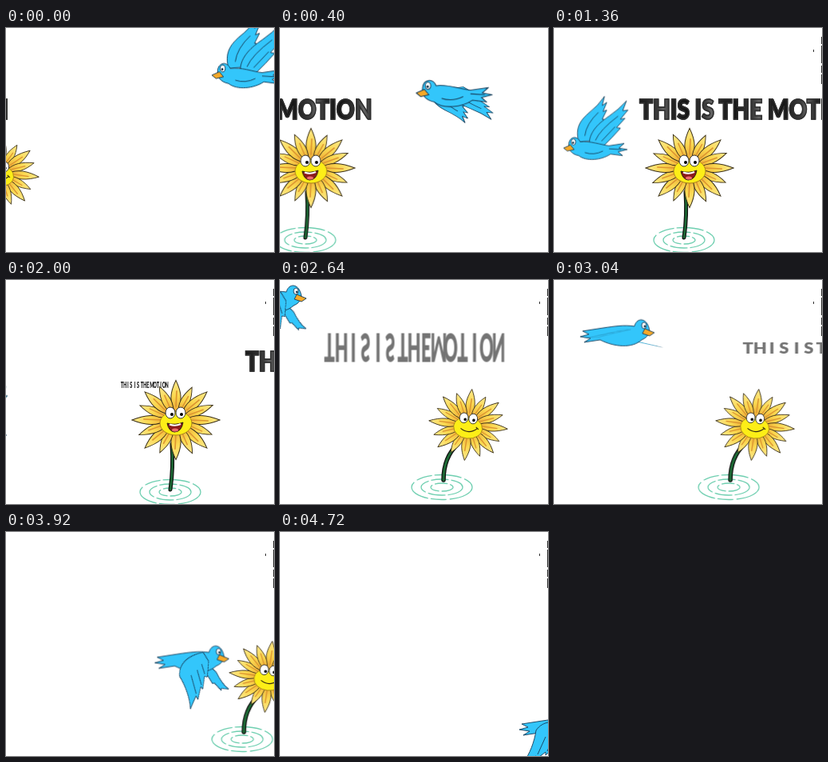
Animation of 336 by 280 pixels, one loop 4800 ms. Source, as an HTML page without scripts:

```html
<!DOCTYPE html>
<html lang="en">
<head>
<meta charset="utf-8">
<title>Bird, flower and text</title>
<style>
html, body { margin: 0; width: 100%; height: 100%; overflow: hidden; background: #fff; }
main { position: relative; width: 100%; height: 100%; overflow: hidden; contain: strict; }
svg, div { position: absolute; left: 0; top: 0; }
svg { display: block; width: 100%; height: 100%; }

/* one 4.8 s loop, 80 ms per step; the tiny lead avoids rounding at step edges */
.loop { animation: 4800ms -2ms infinite both; }

.fly-left { animation-name: fly-left; }
.fly-right { animation-name: fly-right; }
.flower { animation-name: grow-right; }
.upright, .leaning, .edge { animation-timing-function: step-end; }
.upright { animation-name: upright; }
.leaning { animation-name: leaning; }
.edge { animation-name: edge; }
.wing { animation: flap 640ms -2ms infinite steps(2); }
.left-wing { transform-origin: 40px -5px; --down: 0deg; }
.front-wing { transform-origin: -28px 10px; --down: 38deg; }
.back-wing { transform-origin: -45px 0; --down: -40deg; }

.title, .spin { font-family: Lato, sans-serif; font-weight: 900; line-height: 1; white-space: nowrap; }
.title {
  top: 84px; font-size: 28px; color: transparent;
  scale: 1 1.22; transform-origin: 0 0;
  background: repeating-linear-gradient(90deg, #151515 0, #3a3a3a 22px, #666 30px, #222 42px, #151515 60px);
  -webkit-background-clip: text; background-clip: text;
  -webkit-text-stroke: 1.4px #303030;
  animation-name: slide;
}
.spin { left: 168px; top: 85px; font-size: 22px; translate: -50% -50%; animation-name: zoom; }
.spin b { display: inline-flex; justify-content: center; width: .68em; font-weight: 900; animation-name: flip; }

@keyframes fly-left {
  0% { transform: translate(258px, 59px) scale(1.05); animation-timing-function: steps(9); }
  15% { transform: translate(101px, 99px) scale(1.2); animation-timing-function: steps(8); }
  28.3333% { transform: translate(12px, 150px) scale(.95); animation-timing-function: steps(8); }
  41.6667% { transform: translate(-79px, 192px) scale(.95); animation-timing-function: steps(2); }
  45%, 100% { transform: translate(-110px, 204px) scale(.95); }
}
@keyframes fly-right {
  0%, 41.6667% { transform: translate(-115px, -45px); animation-timing-function: steps(8); }
  55% { transform: translate(33px, 23px); animation-timing-function: steps(9); }
  70% { transform: translate(200px, 100px); animation-timing-function: steps(17); }
  98.3333%, 100% { transform: translate(393px, 242px); }
}
@keyframes flap {
  0%, 12.5% { transform: rotate(var(--down)) scaleY(1); animation-timing-function: steps(1); }
  25%, 37.5% { transform: rotate(0deg) scaleY(1); }
  62.5% { transform: rotate(0deg) scaleY(-.6); animation-timing-function: steps(3); }
  100% { transform: rotate(var(--down)) scaleY(1); }
}
@keyframes grow-right {
  0% { transform: translateX(-41px); animation-timing-function: steps(9); }
  15% { transform: translateX(90px); animation-timing-function: steps(8); }
  28.3333% { transform: translateX(163px); animation-timing-function: steps(8); }
  41.6667% { transform: translateX(206px); animation-timing-function: steps(8); }
  55% { transform: translateX(203px); animation-timing-function: steps(9); }
  70% { transform: translateX(232px); animation-timing-function: steps(17); }
  98.3333%, 100% { transform: translateX(388px); }
}
@keyframes upright { 0% { opacity: 0; } 6.6667% { opacity: 1; } 48.3333%, 100% { opacity: 0; } }
@keyframes leaning { 0% { opacity: 1; } 6.6667% { opacity: 0; } 48.3333%, 100% { opacity: 1; } }
@keyframes edge { 0% { opacity: 0; } 13.3333%, 100% { opacity: 1; } }
@keyframes slide {
  0% { transform: translateX(-277px); animation-timing-function: steps(9); }
  15% { transform: translateX(-75px); animation-timing-function: steps(8); }
  28.3333% { transform: translateX(107px); animation-timing-function: steps(8); }
  41.6667% { transform: translateX(300px); animation-timing-function: steps(2); }
  45%, 100% { transform: translateX(346px); }
}
@keyframes zoom {
  0%, 36.6667% { transform: translate(8px, 65px) scale(0); color: #222; word-spacing: 0em; animation-timing-function: steps(3); }
  41.6667% { transform: translate(5.5px, 46px) scale(.25, .49); color: #222; word-spacing: 0em; animation-timing-function: steps(8); }
  55% { transform: translate(0, 0) scale(1, 2.25); color: #747474; word-spacing: -.19em; animation-timing-function: steps(8); }
  68.3333%, 100% { transform: translate(290px, 0) scale(1, 2.25); color: #747474; word-spacing: -.19em; }
}
@keyframes flip {
  0%, 41.6667% { transform: rotateX(0deg); animation-timing-function: steps(8); }
  55% { transform: rotateX(180deg); animation-timing-function: steps(8); }
  68.3333%, 100% { transform: rotateX(360deg); }
}
</style>
</head>
<body>
<main>
<svg viewBox="0 0 336 280">
  <defs>
    <radialGradient id="gold" gradientUnits="userSpaceOnUse" cx="0" cy="0" r="54">
      <stop offset=".3" stop-color="#eeb13a"/>
      <stop offset=".6" stop-color="#fbd850"/>
      <stop offset="1" stop-color="#fde88a"/>
    </radialGradient>
    <g id="petal">
      <path d="M0-10C-9-24-7-38 0-54C7-38 9-24 0-10Z" fill="url(#gold)" stroke="#3a3018"/>
      <path d="M0-18L1-40" stroke="#dc9430" stroke-width="1.6"/>
    </g>
    <g id="quarter">
      <use href="#petal"/>
      <use href="#petal" transform="rotate(24) scale(.9)"/>
      <use href="#petal" transform="rotate(45)"/>
      <use href="#petal" transform="rotate(66) scale(.92)"/>
    </g>
    <g id="head">
      <g transform="scale(1.02 .92)">
        <use href="#quarter"/>
        <use href="#quarter" transform="rotate(90)"/>
        <use href="#quarter" transform="rotate(180)"/>
        <use href="#quarter" transform="rotate(270)"/>
      </g>
      <ellipse cy="4" rx="20" ry="15" fill="#fdee17" stroke="#a8841c"/>
      <g fill="#fff" stroke="#222" stroke-width=".9">
        <ellipse cx="-7" cy="-9" rx="6" ry="7"/>
        <ellipse cx="6" cy="-9" rx="6" ry="7"/>
      </g>
      <circle cx="-5" cy="-7" r="2"/>
      <circle cx="7" cy="-7" r="2"/>
    </g>
    <g id="rings" fill="none" stroke="#6fcfb0" stroke-width="1.3">
      <ellipse rx="38" ry="15.5" stroke-dasharray="34 4 20 3"/>
      <ellipse rx="26" ry="10" stroke-dasharray="22 3"/>
      <ellipse rx="14" ry="5" stroke-dasharray="16 3"/>
    </g>
  </defs>

  <g class="loop edge" stroke="#333">
    <path d="M335.5 11V70" stroke-dasharray="9 2 22 3"/>
    <path d="M325.5 27v3"/>
  </g>

  <g class="loop flower">
    <g class="loop upright">
      <use href="#rings" y="265"/>
      <g fill="none" stroke-linecap="round">
        <path d="M0 262Q4 235 2 205" stroke="#111" stroke-width="5"/>
        <path d="M0 262Q4 235 2 205" stroke="#1d6a35" stroke-width="2.5"/>
      </g>
      <g transform="translate(7 175)">
        <use href="#head"/>
        <path d="M-11 4Q-1 7 9 3Q7 15-2 15Q-9 14-11 4Z" fill="#8c1a1a" stroke="#221"/>
        <path d="M-8 5.500Q-1 8 6 5" fill="none" stroke="#fff" stroke-width="2"/>
        <ellipse cx="-1" cy="12.500" rx="4" ry="2" fill="#ef6b6b"/>
      </g>
    </g>
    <g class="loop leaning">
      <use href="#rings" y="259"/>
      <g fill="none" stroke-linecap="round">
        <path d="M2 250C2 232 8 216 20 205" stroke="#111" stroke-width="5.5"/>
        <path d="M2 250C2 232 8 216 20 205" stroke="#1d6a35" stroke-width="3"/>
      </g>
      <g transform="translate(33 181) rotate(6) scale(.9)">
        <use href="#head"/>
        <path d="M-10 6Q2 14 13 4M11 2l4 3" fill="none" stroke="#332a10" stroke-width="1.2"/>
      </g>
    </g>
  </g>

  <g class="loop fly-left" fill="#33c6fb" stroke="#163c58" stroke-width=".9" stroke-linejoin="round">
    <g class="wing left-wing">
      <path d="M20-8C15-26 22-36 32-45Q46-56 54-68L51-56L57-60L52-48L57-50L51-38L53-38L44-10Z"/>
      <path d="M34-6C34-22 48-34 60-42Q72-50 83-62L78-49L85-50L75-38L81-39L70-27L75-26L64-14L52-2Z"/>
      <path d="M28-16Q30-32 46-47M42-10Q48-24 72-42M50-9L68-28" fill="none"/>
    </g>
    <path d="M7-6C8-15 18-17 22-8C34-10 50-4 60-3L80-6L73 0L84 2L72 5L78 10L62 8C50 16 30 18 20 10C10 8 6 2 7-6Z"/>
    <path d="M60 1L76 2M28 6Q40 10 52 4" fill="none"/>
    <path d="M0 0L9-4L14 2L5 4Z" fill="#f6a928"/>
    <ellipse cx="13" cy="-8" rx="3" ry="4" fill="#fff"/>
    <circle cx="12.500" cy="-7" r="1" fill="#000"/>
  </g>

  <g class="loop fly-right" fill="#33c6fb" stroke="#163c58" stroke-width=".9" stroke-linejoin="round">
    <path class="wing front-wing" d="M-30 6L-14 8Q0 15 11 15L3 20L5 22L-8 20L-9 22L-28 15Z"/>
    <path d="M-6-2C-8-19-22-20-25-8C-38-10-50-8-64-6L-90-2L-82 2L-93 5L-80 7L-88 12L-68 9C-50 18-28 20-16 9Q-8 6-6-2Z"/>
    <g class="wing back-wing">
      <path d="M-30 2C-48-8-64-6-72 6C-74 20-80 36-88 46L-72 38L-73 43L-60 33L-60 37L-48 26L-46 29L-32 15Z"/>
      <path d="M-70 36L-60 14M-58 32L-50 14M-46 24L-41 12" fill="none"/>
    </g>
    <path d="M0 0L-12-5L-15 1L-6 4Z" fill="#f6a928"/>
    <ellipse cx="-13" cy="-9" rx="3" ry="4" fill="#fff"/>
    <circle cx="-12" cy="-8" r="1" fill="#000"/>
  </g>
</svg>

<div class="loop title">THIS IS THE MOTION</div>
<div class="loop spin"><b class="loop">T</b><b class="loop">H</b><b class="loop">I</b><b class="loop">S</b> <b class="loop">I</b><b class="loop">S</b> <b class="loop">T</b><b class="loop">H</b><b class="loop">E</b> <b class="loop">M</b><b class="loop">O</b><b class="loop">T</b><b class="loop">I</b><b class="loop">O</b><b class="loop">N</b></div>
</main>
</body>
</html>
```
